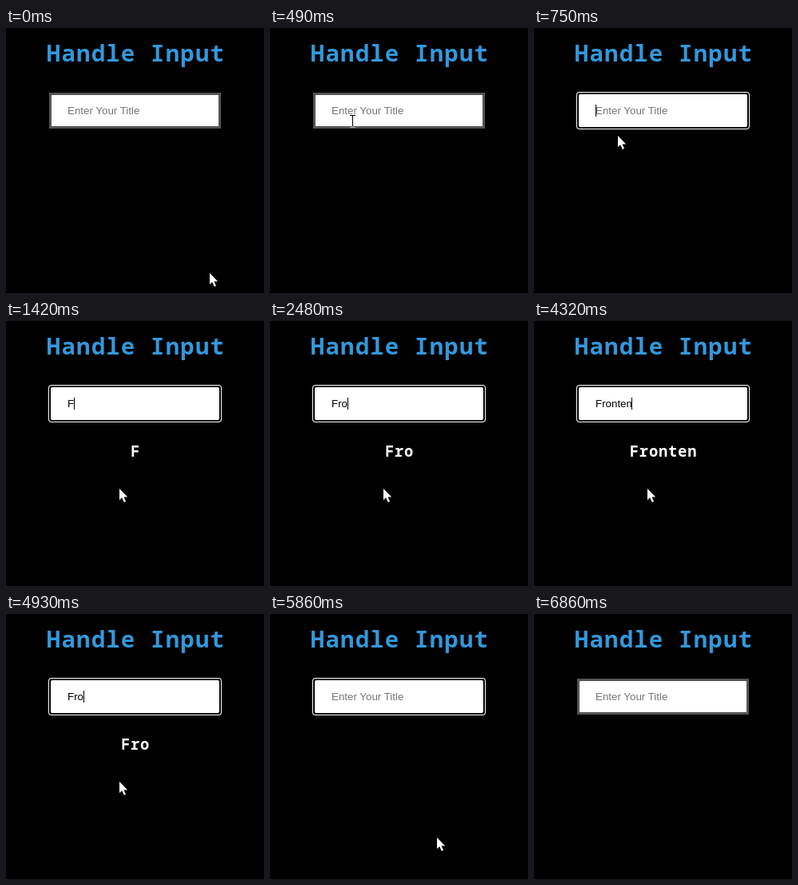
These frames come from a looping animation (323x332 px, 6990 ms). An HTML page:

```html
<!DOCTYPE html>
<html lang="en">
<head>
<meta charset="utf-8">
<title>Handle Input</title>
<style>
  html, body { margin: 0; width: 100%; height: 100%; overflow: hidden; background: #000; }
  svg { display: block; }
  .mono { font-family: "Noto Sans Mono", monospace; font-weight: 700; letter-spacing: .042em; text-anchor: middle; }
  .field { font: 13.333px "Liberation Sans", Arial, sans-serif; }
  #beam { fill: none; stroke: #fff; mix-blend-mode: difference; }
</style>
</head>
<body>
<svg width="323" height="332" viewBox="0 0 323 332">
  <rect width="323" height="332"/>
  <text class="mono" x="162.5" y="42" font-size="29" fill="#3498db">Handle Input</text>

  <g id="idle">
    <rect x="54" y="81" width="215" height="45" fill="#555"/>
    <rect x="57" y="84" width="209" height="39" fill="#fff"/>
  </g>
  <g id="focused">
    <rect x="53" y="80" width="217" height="47" rx="4" fill="#fff"/>
    <rect x="54" y="81" width="215" height="45" rx="3"/>
    <rect x="56" y="83" width="211" height="41" rx="2" fill="#fff"/>
  </g>

  <text id="hint" class="field" x="77" y="108" fill="#757575">Enter Your Title</text>
  <text id="typed" class="field" x="77" y="108"></text>
  <rect id="caret" y="96" width="1" height="15"/>
  <text id="echo" class="mono" x="162" y="170" font-size="18.8" fill="#fff"></text>

  <path id="arrow" d="M0 0V14.2L3.2 11.2 5.8 17 8 16 5.5 10.4H10.2Z" fill="#fff" stroke="#000" paint-order="stroke"/>
  <path id="beam" d="M-3-7.5H4M.5-7.5V7.5M-3 7.5H4"/>
</svg>
<script>
const LOOP = 6990;
const $ = id => document.getElementById(id);

// [start time, x, y]; each pose holds until the next
const pointer = [
  [0, 255, 307], [70, 247, 296], [140, 228, 270], [210, 200, 233], [280, 168, 193],
  [350, 138, 157], [420, 115, 131], [490, 103, 117], [560, 102, 114], [690, 103, 122],
  [750, 105, 135], [820, 125, 178], [890, 142, 210],
  [5860, 209, 280], [5930, 233, 306], [6000, 245, 323], [6070, 250, 350]
];

// [start time, field content]
const typing = [
  [0, ""], [1420, "F"], [2090, "Fr"], [2480, "Fro"], [2810, "Fron"], [3010, "Front"],
  [3340, "Fronte"], [3720, "Fronten"], [3850, "Frontend"], [4320, "Fronten"],
  [4860, "Front"], [4930, "Fro"], [5000, ""]
];

const focusSpan = [[560, 6860]];
const caretSpans = [[560, 1090], [1420, 1880], [2090, 5460], [6000, 6530]];

const at = (keys, t) => keys.findLast(key => key[0] <= t);
const within = (spans, t) => spans.some(([from, to]) => t >= from && t < to);
const show = (id, on) => $(id).style.display = on ? "" : "none";

function draw(t) {
  const focused = within(focusSpan, t);
  const text = at(typing, t)[1];
  const [, x, y] = at(pointer, t);
  const overField = x >= 54 && x < 269 && y >= 81 && y < 126;

  show("idle", !focused);
  show("focused", focused);
  show("hint", !text);
  show("caret", within(caretSpans, t));
  show("arrow", !overField);
  show("beam", overField);

  $("typed").textContent = $("echo").textContent = text;
  const width = text ? $("typed").getComputedTextLength() : 0;
  $("caret").setAttribute("x", Math.floor(77 + width));
  for (const id of ["arrow", "beam"]) $(id).setAttribute("transform", `translate(${x} ${y})`);
}

const start = performance.now();
function tick() {
  draw((performance.now() - start) % LOOP);
  requestAnimationFrame(tick);
}
tick();
</script>
</body>
</html>
```
